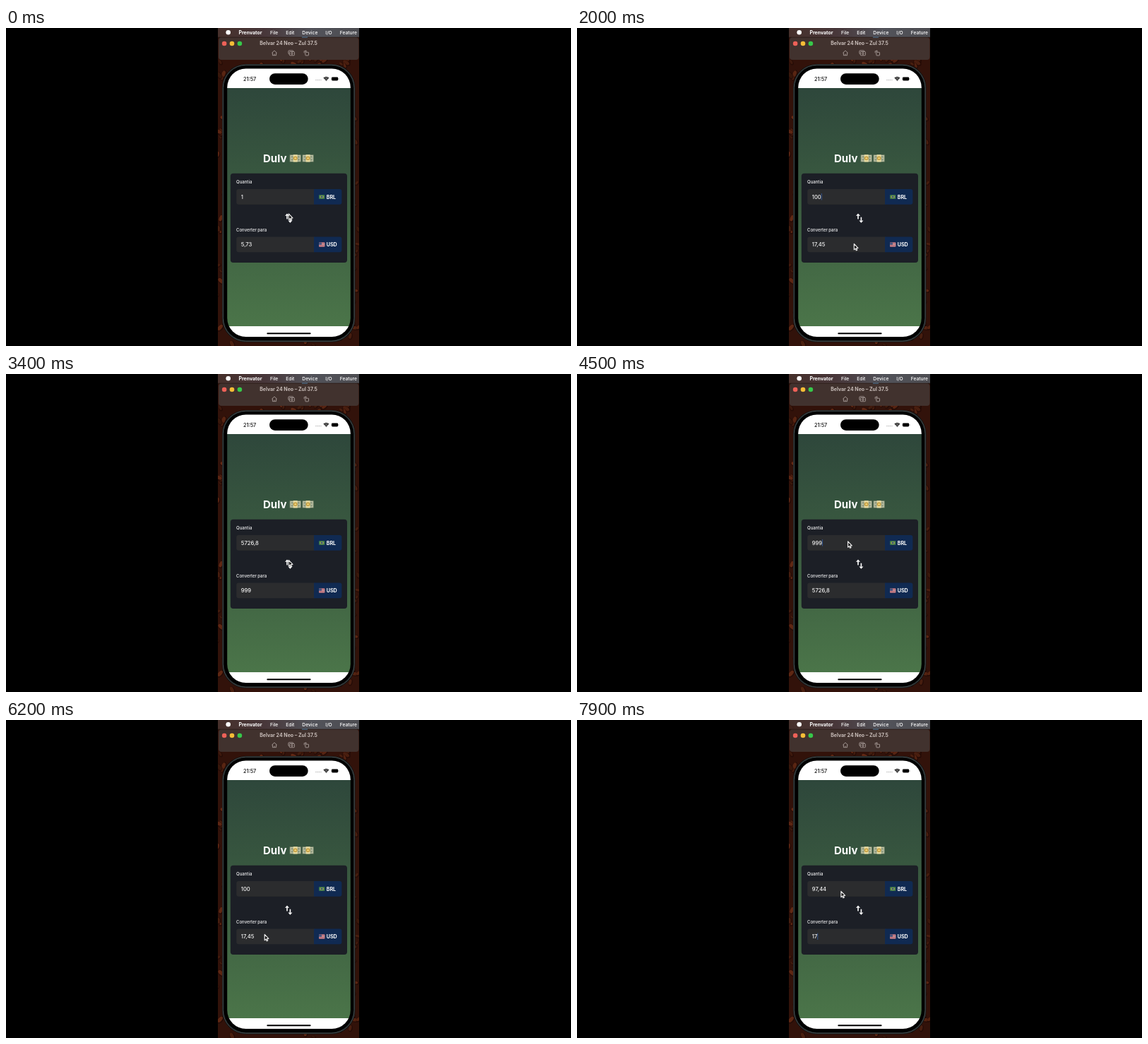
An HTML page with a canvas for the animation above (8000 ms loop, 800 by 450 pixels).

```html
<!DOCTYPE html>
<html lang="pt">
<head>
<meta charset="utf-8">
<title>Currency converter</title>
<style>
  html, body { margin: 0; width: 100%; height: 100%; overflow: hidden; background: #000; }
  canvas { display: block; width: 800px; height: 450px; }
</style>
</head>
<body>
<canvas id="stage"></canvas>
<script>
const LOOP = 8000, STEP = 100, RATE = 5.73181;
const FONT = 'Inter, Roboto, sans-serif';
const TOP = 0, BOTTOM = 1, NONE = -1;
const canvas = document.getElementById('stage');
const ratio = window.devicePixelRatio || 1;
canvas.width = 800 * ratio;
canvas.height = 450 * ratio;
const ctx = canvas.getContext('2d');
ctx.scale(ratio, ratio);
ctx.lineJoin = 'round';

// '<' deletes one character; keys follow the focus at a steady pace
const actions = [
  { at: 600, field: TOP, every: 250, keys: '<100' },
  { at: 2100, field: BOTTOM, every: 100, keys: '<<<<<999' },
  { at: 3700, swap: true },
  { at: 4400, field: TOP, every: 150, keys: '<<<100' },
  { at: 6400, field: BOTTOM, every: 130, keys: '<<<' }
];

// where the pointer rests, and from when to when
const rests = [
  { from: 0, to: 100, x: 400.3, y: 263 },
  { from: 600, to: 1400, x: 400, y: 241.5 },
  { from: 2000, to: 2800, x: 392.3, y: 305.5 },
  { from: 3300, to: 3800, x: 400.3, y: 263.5 },
  { from: 4300, to: 5500, x: 383.6, y: 237 },
  { from: 6200, to: 7100, x: 366.2, y: 303.5 },
  { from: 7900, to: LOOP, x: 373.9, y: 242.5 }
];

function press(str, key) {
  if (key === '<') return str.slice(0, -1) || '0';
  return str === '0' ? key : str + key;
}

function money(value) {
  const cents = Math.round(value * 100);
  return cents ? `${Math.floor(cents / 100)},${cents % 100}` : '0';
}

function stateAt(t) {
  let values = ['1', '5,73'], focus = NONE, since = 0;
  for (const { at, field, every, keys, swap } of actions) {
    if (at > t) break;
    since = at;
    if (swap) {
      values.reverse();
      focus = NONE;
      continue;
    }
    focus = field;
    const count = Math.min(keys.length, Math.floor((t - at) / every));
    for (const key of keys.slice(0, count)) values[field] = press(values[field], key);
    if (count) {
      since = at + count * every;
      const number = parseFloat(values[field].replace(',', '.'));
      values[1 - field] = money(field === TOP ? number / RATE : number * RATE);
    }
  }
  return { values, caret: (t - since) % 1000 < 500 ? focus : NONE };
}

function pointerAt(t) {
  const i = rests.findIndex(r => t <= r.to);
  const next = rests[i], prev = rests[i - 1];
  if (t >= next.from) return next;
  const k = (t - prev.to) / (next.from - prev.to), e = k * k * (3 - 2 * k);
  return { x: prev.x + (next.x - prev.x) * e, y: prev.y + (next.y - prev.y) * e };
}

function box(x, y, w, h, r, fill) {
  ctx.beginPath();
  ctx.roundRect(x, y, w, h, r);
  ctx.fillStyle = fill;
  ctx.fill();
}

function frame(x, y, w, h, r) {
  ctx.beginPath();
  ctx.roundRect(x, y, w, h, r);
  ctx.stroke();
}

function oval(x, y, rx, ry, turn, fill) {
  ctx.beginPath();
  ctx.ellipse(x, y, rx, ry, turn, 0, Math.PI * 2);
  ctx.fillStyle = fill;
  ctx.fill();
}

function dot(x, y, r, fill) {
  oval(x, y, r, r, 0, fill);
}

function text(str, x, y, size, weight, fill, align = 'left') {
  ctx.font = `${weight} ${size}px ${FONT}`;
  ctx.textAlign = align;
  ctx.fillStyle = fill;
  ctx.fillText(str, x, y);
  return ctx.measureText(str).width;
}

function linear(x0, y0, x1, y1, stops) {
  const g = ctx.createLinearGradient(x0, y0, x1, y1);
  stops.forEach((c, i) => g.addColorStop(i / (stops.length - 1), c));
  return g;
}

function random(seed) {
  return () => (seed = (seed * 16807) % 2147483647) / 2147483647;
}

function drawDesktop() {
  box(300, 0, 200, 450, 0, '#32120a');
  const rnd = random(71);
  for (let i = 0; i < 420; i++) {
    const x = 300 + rnd() * 200, y = 40 + rnd() * 410;
    const r = 2.5 + rnd() * 4, turn = rnd() * 3, light = 13 + rnd() * 12;
    oval(x, y, r, r * 0.6, turn, 'rgba(28, 9, 5, 0.6)');
    oval(x - 0.5, y - 0.6, r * 0.8, r * 0.42, turn, `hsl(16 66% ${light}%)`);
  }
}

function drawMenuBar() {
  box(300, 0, 200, 13, 0, linear(300, 0, 500, 0, ['#46302b', '#48373a', '#52535a', '#4d4d52']));
  dot(314.7, 6.2, 3.3, '#fff');
  text('Prenvator', 329.5, 8.9, 6.9, 700, '#fff');
  let x = 374;
  for (const item of ['File', 'Edit', 'Device', 'I/O', 'Feature']) {
    x += text(item, x, 8.9, 6.7, 500, '#fff') + 11;
  }
  box(300, 12.7, 200, 1, 0, '#241815');
  box(419, 12.7, 8, 1.2, 0, '#4b87b5');
}

function drawWindowBar() {
  box(301, 13.6, 198.5, 31.4, 4, '#41322e');
  ['#ed6158', '#f4bd36', '#37c84a'].forEach((c, i) => dot(309.1 + i * 10.9, 22, 3.3, c));
  text('Belvar 24 Neo – Zul 37.5', 400, 24.4, 7, 700, '#c8bdb9', 'center');
  ctx.strokeStyle = '#b5aaa6';
  ctx.lineWidth = 0.8;
  ctx.stroke(new Path2D('M376.4 35.3L380 32l3.6 3.3M377.4 34.8v3.9h5.2v-3.9M380 38.7v-2'));
  frame(399.9, 31.9, 6.9, 4.8, 1);
  box(401.3, 33.5, 7.2, 5.3, 1, '#41322e');
  frame(401.3, 33.5, 7.2, 5.3, 1);
  frame(403.6, 34.8, 2.6, 2.6, 1.3);
  frame(423.8, 34.3, 4.7, 4.6, 0.7);
  ctx.stroke(new Path2D('M422.2 35.4v-2.7h3M424.1 31.6l1.2 1.1l-1.2 1.1'));
}

function drawStatusBar() {
  text('21:57', 335.9, 74.8, 7.3, 500, '#111');
  box(373, 64.3, 54.7, 15.6, 7.8, '#000');
  for (let i = 0; i < 4; i++) dot(439 + i * 2.3, 73.6, 0.55, '#888');
  ctx.strokeStyle = '#000';
  ctx.lineWidth = 1.1;
  for (let r = 0.6; r < 6; r += 1.6) {
    ctx.beginPath();
    ctx.arc(453.4, 75, r, -Math.PI * 0.74, -Math.PI * 0.26);
    ctx.stroke();
  }
  box(460.9, 69.5, 9.3, 5, 1.4, '#000');
  box(470.6, 71.2, 0.8, 1.7, 0.4, '#777');
}

function drawPhone() {
  box(306, 51, 188.5, 393.5, 33.5, '#111414');
  ctx.strokeStyle = '#485052';
  ctx.lineWidth = 1;
  frame(307.2, 52.2, 186, 391, 32.5);
  box(308.7, 53.7, 183, 388, 31, '#000');
  // one fill with hard stops keeps the edge free of fringes
  const screen = ctx.createLinearGradient(0, 57, 0, 437);
  const stop = (y, c) => screen.addColorStop((y - 57) / 380, c);
  stop(85, '#fff');
  stop(85, '#2e473b');
  stop(253, '#3c5d41');
  stop(422, '#4b7549');
  stop(422, '#fff');
  box(313.2, 57.6, 174.6, 379.4, 26.5, screen);
  drawStatusBar();
  box(369.3, 431.3, 62.3, 1.9, 1, '#000');
}

function drawNote(x) {
  box(x, 179.2, 16, 10.3, 0.5, '#818d72');
  box(x + 0.8, 180, 14.4, 8.7, 0.3, '#c3c8ad');
  box(x + 1.8, 181, 12.4, 6.7, 0.8, '#8f9a7e');
  box(x + 5, 179.2, 6, 10.3, 0, '#e6daa0');
  dot(x + 8, 184.3, 2.8, '#c39a3c');
  dot(x + 8, 184.3, 1.5, '#ead07a');
  for (const side of [3, 13]) dot(x + side, 184.3, 0.9, '#ccd0b8');
}

function drawFlag(x, y, code) {
  if (code === 'BRL') {
    box(x, y, 8.4, 6, 1, '#39744c');
    oval(x + 4.2, y + 3, 2.9, 1.9, 0, '#97a34c');
    dot(x + 4.2, y + 3, 1.4, '#36597c');
  } else {
    box(x, y, 8.4, 6, 1, '#c9aab2');
    for (let i = 0; i < 4; i++) box(x, y + i * 1.72, 8.4, 0.86, 0.4, '#b8454f');
    box(x, y, 4, 3.3, 0.6, '#465680');
  }
}

function drawField(label, value, code, top, caret) {
  text(label, 326.1, top - 7.6, 6, 500, '#f2f2f3');
  box(326.3, top, 110, 21.7, [3, 0, 0, 3], '#2b2c2e');
  box(436, top, 39.4, 21.7, [0, 3, 3, 0], '#102a52');
  const width = text(value, 332.8, top + 13.7, 7.6, 500, '#f4f4f4');
  if (caret) box(332.9 + width, top + 6, 0.8, 9.6, 0.3, '#365fa5');
  drawFlag(443, top + 8, code);
  text(code, 453.7, top + 13.5, 7.1, 700, '#fff');
}

function drawArrow(x, tip, dir) {
  ctx.fillStyle = '#fff';
  ctx.beginPath();
  ctx.moveTo(x, tip);
  ctx.lineTo(x + 3, tip + dir * 3.3);
  ctx.lineTo(x - 3, tip + dir * 3.3);
  ctx.fill();
  ctx.fillRect(x - 0.8, tip + dir * 3, 1.6, dir * 5);
}

const arrowhead = new Path2D('M0 0V8.2L1.8 6.6L3 9.3L4.4 8.7L3.2 6.1L5.7 5.9Z');

function drawPointer({ x, y }) {
  ctx.save();
  ctx.translate(x, y);
  ctx.fillStyle = '#111';
  ctx.fill(arrowhead);
  ctx.lineWidth = 1.2;
  ctx.strokeStyle = '#e8e8e8';
  ctx.stroke(arrowhead);
  ctx.restore();
}

function render(t) {
  const { values, caret } = stateAt(t);
  ctx.fillStyle = '#000';
  ctx.fillRect(0, 0, 800, 450);
  ctx.save();
  ctx.beginPath();
  ctx.rect(300, 0, 200, 450);
  ctx.clip();
  drawDesktop();
  drawMenuBar();
  drawWindowBar();
  drawPhone();
  text('Dulv', 364, 189.8, 15, 700, '#fff');
  drawNote(401.7);
  drawNote(419.6);
  box(317.8, 205.8, 165.2, 126.2, 4, '#1c1f26');
  drawField('Quantia', values[TOP], 'BRL', 228, caret === TOP);
  drawField('Converter para', values[BOTTOM], 'USD', 295.5, caret === BOTTOM);
  drawArrow(398, 262.4, 1);
  drawArrow(402.4, 275.7, -1);
  drawPointer(pointerAt(t));
  ctx.restore();
}

function tick() {
  const t = performance.now() % LOOP;
  render(Math.floor(t / STEP) * STEP);
  requestAnimationFrame(tick);
}
tick();
</script>
</body>
</html>
```
